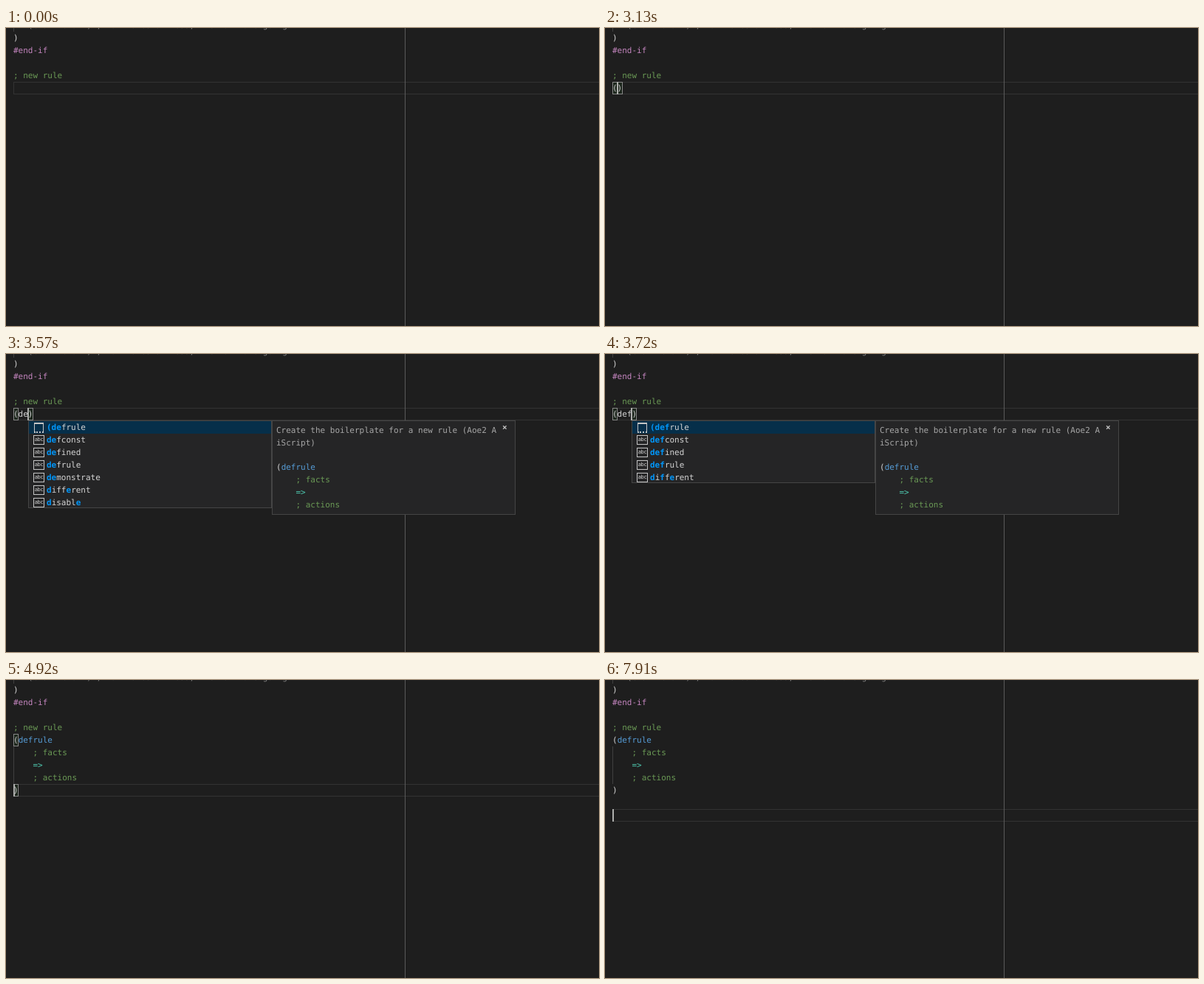
Animation, 803 px wide and 404 px high, one loop 8000 ms. Source, as an HTML page:

```html
<!DOCTYPE html>
<html lang="en">
<head>
<meta charset="utf-8">
<title>Snippet completion</title>
<style>
  html, body { margin: 0; height: 100%; overflow: hidden; background: #1e1e1e; }
  #stage { position: relative; width: 803px; height: 404px; overflow: hidden;
    font: 11px/17px "DejaVu Sans Mono", monospace; color: #d4d4d4;
    white-space: pre; text-rendering: geometricPrecision; }
  #stage div { position: absolute; box-sizing: border-box; }
  .current { border: 1px solid #333; border-right: 0; }
  .ruler { background: #5a5a5a; }
  .guide { background: #404040; }
  .bracket { border: 1px solid #888; background: rgba(0, 100, 0, .1); }
  .caret { background: #aeafad; }
  .panel { background: #252526; border: 1px solid #454545; overflow: hidden; }
  .selected { background: #062f4a; }
  .word { border: 1px solid #c5c5c5; font-size: 7px; line-height: 10px; text-align: center; letter-spacing: -.3px; }
  .snippet { border: solid #c5c5c5; border-width: 2px 1px; border-bottom-style: dotted; }
  .dim { color: #a6a6a6; }
  .faint { color: #858585; }
  .close { color: #c5c5c5; font-weight: bold; }
  .comment { color: #6a9955; }
  .directive { color: #c586c0; }
  .keyword { color: #569cd6; }
  .arrow { color: #4ec9b0; }
  b { color: #0097fb; }
</style>
</head>
<body>
<div id="stage"></div>
<script>
const stage = document.getElementById('stage');
const LEFT = 10, TOP = 73, LINE = 17, CHAR = 6.62, LOOP = 8000;
const RULE = '(defrule\n    ; facts\n    =>\n    ; actions\n)';

// start, text below the comment, caret row, caret column
const steps = [
  [0, '', 0, 0], [3130, '()', 0, 1], [3430, '(d)', 0, 2], [3570, '(de)', 0, 3], [3720, '(def)', 0, 4],
  [4920, RULE, 4, 0], [7160, RULE, 4, 1], [7610, RULE, 5, 0], [7910, RULE, 6, 0]
];
const blinks = [290, 740, 1330, 1780, 2230, 2830, 3130, 4170, 4620, 5370, 5970, 6410, 6860];

// matched letters are marked with [ ]
const suggestions = {
  d: '[(d]efrule [d]efconst [d]efined [d]efrule [d]emonstrate [d]ifferent [d]isable [d]o [d]own',
  de: '[(de]frule [de]fconst [de]fined [de]frule [de]monstrate [d]iff[e]rent [d]isabl[e]',
  def: '[(def]rule [def]const [def]ined [def]rule [d]i[f]f[e]rent'
};

const box = (kind, x, y, w, h, content = '') =>
  `<div class="${kind}" style="left:${x}px;top:${y}px;width:${w}px;height:${h}px">${content}</div>`;
const text = (x, y, content, kind = '') =>
  `<div class="${kind}" style="left:${x}px;top:${y}px">${content}</div>`;
const rowY = row => TOP + row * LINE;
const caretX = col => LEFT + Math.floor(col * 6.4);

const highlight = code => code.replace(/;.*|#end-if|defrule|=>/g, token => {
  const kind = { ';': 'comment', '#': 'directive', d: 'keyword', '=': 'arrow' }[token[0]];
  return `<span class="${kind}">${token.replace('>', '&gt;')}</span>`;
});

function popup(x, typed) {
  const items = suggestions[typed].split(' ');
  const rows = items.map((item, i) => {
    const y = i * LINE;
    return (i ? box('word', 6, y + 2, 15, 13, 'abc') : box('selected', 0, 0, 328, LINE) + box('snippet', 7, 2, 13, 14)) +
      text(24, y, item.replace(/\[(.*?)\]/g, '<b>$1</b>'));
  }).join('');
  const details =
    text(5, 4, 'Create the boilerplate for a new rule (Aoe2 A\niScript)', 'dim') +
    text(5, 54, highlight(RULE.slice(0, -2))) +
    text(311, 0, '×', 'close');
  return box('panel', x, 90, 330, items.length * LINE, rows) + box('panel', x + 330, 90, 330, 128, details);
}

function picture(t) {
  const [, code, row, col] = steps.findLast(step => step[0] <= t);
  const caretOn = blinks.filter(time => time <= t).length % 2;
  const expanded = code === RULE;
  let html = box('current', LEFT, rowY(row), 800, LINE) + box('guide', LEFT, 0, 1, 5);
  if (expanded) html += box('guide', LEFT, rowY(1), 1, 3 * LINE);
  html += box('ruler', 540, 0, 1, 404);
  if (code && row < 5) {
    const closeX = expanded ? LEFT : Math.round(LEFT + col * CHAR);
    html += box('bracket', LEFT, TOP, 7, LINE) + box('bracket', closeX, rowY(row), 7, LINE);
  }
  html += text(LEFT, rowY(-5), '   (chat-to-all) ; warn once or less, then all are going', 'faint') +
    text(LEFT, rowY(-4), highlight(')\n#end-if\n\n; new rule\n') + (expanded ? highlight(code) : code));
  if (caretOn) html += box('caret', caretX(col), rowY(row), 2, LINE);
  const typed = code.slice(1, -1);
  if (suggestions[typed]) html += popup(caretX(col) + 1, typed);
  return html;
}

let shown;
function draw() {
  const html = picture(performance.now() % LOOP);
  if (html !== shown) stage.innerHTML = shown = html;
  requestAnimationFrame(draw);
}
draw();
</script>
</body>
</html>
```
